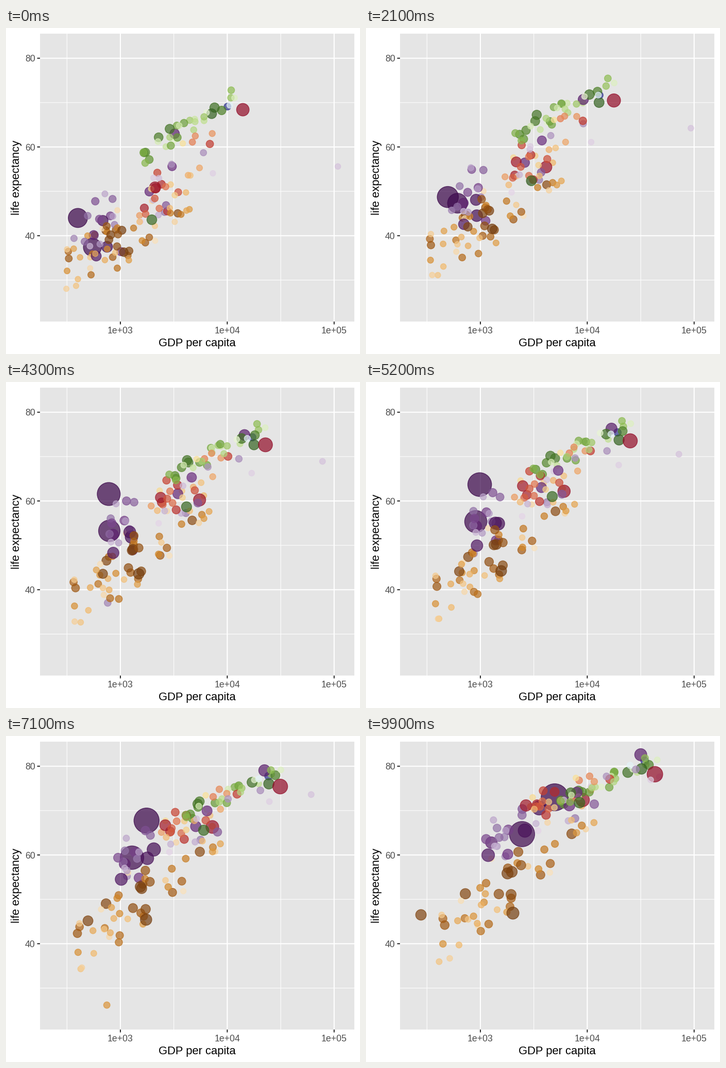
Animation of 687x633 px, one loop 10 s. Source, as a matplotlib script:

```python
import numpy as np
import matplotlib.pyplot as plt
from matplotlib.animation import FuncAnimation
from matplotlib.patches import Rectangle

W, H, DPI = 687, 633, 128
PX = 72 / DPI                      # points per pixel
FRAMES, STEPS = 100, 12            # one survey every five years
LEFT, RIGHT, TOP, BOTTOM = 66, 676, 11, 570
PANEL, ALPHA, MAX_POP = 229 / 255, .7, 1319

plt.rcParams["font.family"] = ["Liberation Sans"]
rng = np.random.default_rng(7)
time = np.linspace(0, 1, STEPS)


def sx(log_gdp):
    return 222 + 207.4 * (log_gdp - 3)


def sy(life):
    return 58.7 + 8.615 * (80 - life)


def track(gdp0, gdp1, life0, life1, gdp_bend=.9, life_bend=.75, shock=(0, 0)):
    """Eased path of log gdp and life, with an optional one-survey drop."""
    g0, g1 = np.log10([gdp0, gdp1])
    gdp = g0 + (g1 - g0) * time ** gdp_bend
    life = life0 + (life1 - life0) * time ** life_bend
    step, depth = shock
    life[step] -= depth
    return gdp, life


def wander(start, end, skew):
    """Random track from a region's first cloud to its last one."""
    wealth = rng.random() ** skew
    luck = np.clip(rng.normal(), -1.8, 1.8)
    ends = []
    for g0, g1, l0, l1, spread in (start, end):
        u = np.clip(wealth + rng.normal(0, .07), 0, 1)
        ends.append((10 ** (g0 + (g1 - g0) * u), l0 + (l1 - l0) * u + spread * luck))
    (gdp0, life0), (gdp1, life1) = ends
    gdp, life = track(gdp0, gdp1, life0, life1)
    return gdp + rng.normal(0, .015, STEPS), life + rng.normal(0, .25, STEPS)


# top/base/decay: last population in millions by rank, growth: last over first
# start, end: log gdp low, high, life low, high, spread
# leads: rank -> track of the bubbles that stand out
REGIONS = [
    dict(cmap="PuOr", count=52, top=[135], base=100, decay=.1, growth=3.9, skew=1.6,
         start=(2.5, 3.65, 35, 47, 3.8), end=(2.65, 4.1, 44, 70, 4.5),
         leads={0: track(1077, 2014, 36.3, 46.9, .8, .45),
                3: track(781, 278, 39.1, 46.5, 2.5, .6),
                29: track(493, 863, 40, 46.2, shock=(8, 21))}),
    dict(cmap="RdYlBu", count=25, top=[301, 190, 109], base=50, decay=.18, growth=2, skew=1,
         start=(3.15, 3.95, 43, 66, 3.5), end=(3.35, 4.25, 69, 79, 1.8),
         leads={0: track(13990, 42952, 68.4, 78.2, 1, 1),
                1: track(2109, 9066, 50.9, 72.4, .5, 1)}),
    dict(cmap="PRGn", count=33, top=[1319, 1110], base=223, decay=.17, growth=2.45, skew=1.2,
         start=(2.65, 3.85, 38, 60, 4.5), end=(2.95, 4.65, 61, 81, 2.5),
         leads={0: track(400, 4959, 44, 73, 1.6, .6, shock=(2, 10)),
                1: track(547, 2452, 37.4, 64.7, 1.7, .65),
                2: track(750, 3541, 37.5, 70.6, 1.3, 1),
                3: track(685, 2606, 43.4, 65.5, 1, 1),
                5: track(3217, 31656, 63, 82.6, .5, .6),
                19: track(368, 1713, 39.4, 59.7, shock=(5, 17)),
                29: track(108382, 47307, 55.6, 77.6, 1.1, .6)}),
    dict(cmap="PiYG_r", count=30, top=[82], base=82, decay=.15, growth=1.35, skew=.8,
         start=(3.2, 4.1, 58, 72, 1.6), end=(3.75, 4.65, 72, 81.5, .9),
         leads={0: track(7144, 32170, 67.5, 79.4, .6, 1),
                1: track(1969, 8458, 43.6, 71.8, .8, .75)}),
    dict(cmap="RdYlBu_r", count=2, top=[20], base=4, decay=0, growth=2.2,
         leads={0: track(10040, 34435, 69.1, 81.2, 1, 1),
                1: track(10557, 25185, 69.4, 80.2, 1, 1)}),
]

# Shades look softer on a wide-gamut screen
WIDE = np.array([[.8225, .1774, 0], [.0332, .9669, 0], [.0171, .0724, .9108]])


def soften(rgb):
    """Adapt a shade as it is seen through its transparency on the panel."""
    seen = ALPHA * np.array(rgb) + (1 - ALPHA) * PANEL
    linear = WIDE @ (((seen + .055) / 1.055) ** 2.4)
    seen = 1.055 * linear ** (1 / 2.4) - .055
    return *np.clip((seen - (1 - ALPHA) * PANEL) / ALPHA, 0, 1), ALPHA


def build():
    bubbles = []
    for reg in REGIONS:
        cmap, top, n = plt.get_cmap(reg["cmap"]), reg["top"], reg["count"]
        for rank in range(n):
            path = reg["leads"].get(rank)
            if path is None:
                path = wander(reg["start"], reg["end"], reg["skew"])
            if rank < len(top):
                pop = top[rank]
            else:
                pop = reg["base"] * np.exp(-reg["decay"] * (rank - len(top)))
            first = pop / reg["growth"]
            shade = soften(cmap(min(.4 * rank / (n - 1), .4))[:3])
            bubbles.append((*path, first + (pop - first) * time, shade))
    rng.shuffle(order := list(range(len(bubbles))))
    # giants lie underneath
    return sorted((bubbles[i] for i in order), key=lambda b: b[2][-1] < 1000)


gdp, life, pops, colors = zip(*build())
xs, ys = sx(np.array(gdp)), sy(np.array(life))
mm = 2 + 10 * np.sqrt(np.array(pops) / MAX_POP)
diam = 1.5 * (mm * 2.845 + .945) * PX

fig = plt.figure(figsize=(W / DPI, H / DPI), dpi=DPI, facecolor="white")
ax = fig.add_axes([0, 0, 1, 1])
ax.set(xlim=(0, W), ylim=(H, 0))
ax.axis("off")
ax.add_patch(Rectangle((LEFT, TOP), RIGHT - LEFT, BOTTOM - TOP, fc=str(PANEL), lw=0, zorder=0))


def line(x, y, color, width):
    ax.plot(x, y, color=color, lw=width * PX, solid_capstyle="butt", snap=False, zorder=1)


def label(x, y, text, size, color, **kw):
    ax.text(x, y, text, fontsize=size * PX, color=color, va="baseline", **kw)


def grid(log_gdp, life, width):
    for v in log_gdp:
        line([sx(v)] * 2, [TOP, BOTTOM], "white", width)
    for v in life:
        line([LEFT, RIGHT], [sy(v)] * 2, "white", width)


grid((2.5, 3.5, 4.5), (30, 50, 70), 1.07)
grid((3, 4, 5), (40, 60, 80), 2.13)
for v in (3, 4, 5):
    line([sx(v)] * 2, [BOTTOM, BOTTOM + 5.5], "#333333", 2.13)
    label(sx(v), 593, f"1e+0{v}", 17.6, "#4d4d4d", ha="center")
for v in (40, 60, 80):
    line([LEFT - 5.5, LEFT], [sy(v)] * 2, "#333333", 2.13)
    label(56.5, sy(v) + 6.5, str(v), 17.6, "#4d4d4d", ha="right")
label((LEFT + RIGHT) / 2, 618, "GDP per capita", 22, "black", ha="center")
label(26.5, (TOP + BOTTOM) / 2, "life expectancy", 22, "black", ha="center",
      rotation=90, rotation_mode="anchor")

dots = ax.scatter(xs[:, 0], ys[:, 0], s=diam[:, 0] ** 2, c=colors,
                  edgecolors=colors, linewidths=1.42 * PX, zorder=2)


def at(table, t):
    i = min(int(t), STEPS - 2)
    return table[:, i] + (table[:, i + 1] - table[:, i]) * (t - i)


def update(frame):
    t = frame / (FRAMES - 1) * (STEPS - 1)
    dots.set_offsets(np.column_stack([at(xs, t), at(ys, t)]))
    dots.set_sizes(at(diam, t) ** 2)
    return dots,


anim = FuncAnimation(fig, update, frames=FRAMES, interval=100, repeat=True, repeat_delay=0)
plt.show()
```
